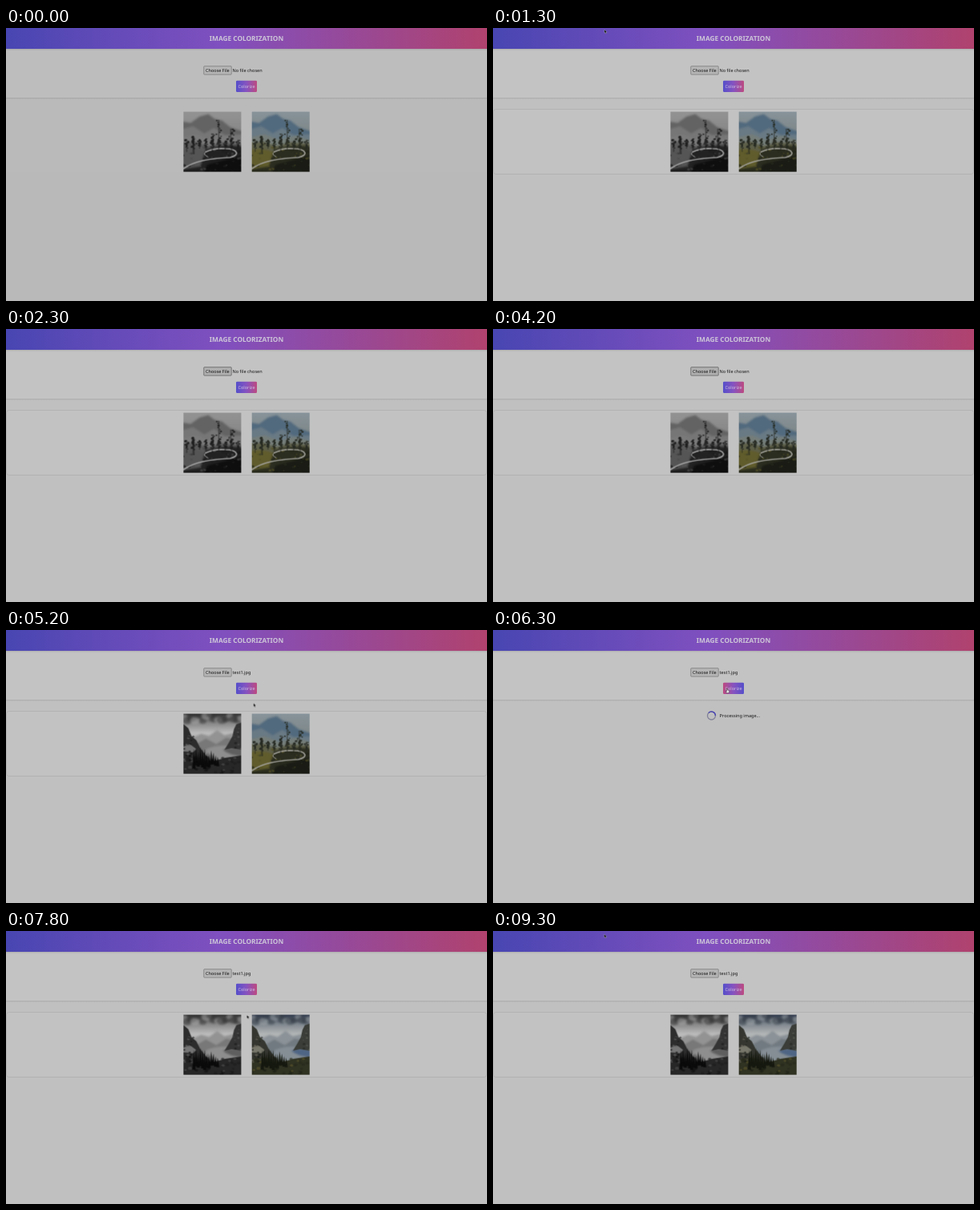
These frames come from a looping animation (600 by 341 pixels, 9400 ms). An HTML page:

```html
<!DOCTYPE html>
<html lang="en">
<head>
<meta charset="utf-8">
<title>Image Colorization</title>
<style>
  html, body { margin: 0; width: 100%; height: 100%; overflow: hidden; background: #c0c0c0; }
  #stage { display: block; width: 100vw; height: 100vh; }
  text { font: 5.55px "Noto Sans", "Open Sans", sans-serif; fill: #161616; text-rendering: geometricPrecision; }
  .title { font-size: 8.3px; font-weight: 600; fill: #cdc6d8; text-anchor: middle; }
  .label { fill: #cbbfdd; text-anchor: middle; }
  .gray { filter: grayscale(1) contrast(1.12); }
  .soft { filter: blur(1.2px); }

  .anim { animation: 9400ms step-end infinite; }
  .dim-top { animation-name: dimTop; }
  .dim-low { animation-name: dimLow; }
  .frame { animation-name: frame; }
  .results { animation-name: results; }
  .busy { animation-name: busy; }
  .spin { animation-name: spin; transform-origin: 272.5px 107px; }
  .old-input { animation-name: oldInput; }
  .new-input { animation-name: newInput; }
  .old-output { animation-name: oldOutput; }
  .new-output { animation-name: newOutput; }
  .no-file { animation-name: noFile; }
  .file { animation-name: file; }
  .choose { animation-name: choose; }
  .pointer { animation-name: pointer; }
  .arrow { animation-name: arrow; }
  .hand { animation-name: hand; }
  .path { animation-name: path; }
  .fill { animation-name: fill; }

  @keyframes dimTop { 0% { opacity: 1 } 10.63%, 100% { opacity: 0 } }
  @keyframes dimLow { 0% { opacity: 1 } 13.82%, 100% { opacity: 0 } }
  @keyframes frame { 0% { opacity: 0 } 10.63%, 100% { opacity: 1 } }
  @keyframes results { 0% { opacity: 1 } 67.01% { opacity: 0 } 76.59%, 100% { opacity: 1 } }
  @keyframes busy { 0% { opacity: 0 } 67.01% { opacity: 1 } 76.59%, 100% { opacity: 0 } }
  @keyframes spin {
    0% { transform: rotate(0) }
    67.01% { transform: rotate(0); animation-timing-function: steps(9) }
    76.59%, 100% { transform: rotate(324deg) }
  }
  @keyframes oldInput { 0% { opacity: 1 } 48.93%, 100% { opacity: 0 } }
  @keyframes newInput { 0% { opacity: 0 } 48.93%, 100% { opacity: 1 } }
  @keyframes oldOutput { 0% { opacity: 1 } 70%, 100% { opacity: 0 } }
  @keyframes newOutput { 0% { opacity: 0 } 70%, 100% { opacity: 1 } }
  @keyframes noFile { 0% { opacity: 1 } 45.74%, 100% { opacity: 0 } }
  @keyframes file { 0% { opacity: 0 } 45.74%, 100% { opacity: 1 } }
  @keyframes choose {
    0% { fill: #b5b5b5; stroke: #747474 }
    21.27% { fill: #afafaf; stroke: #565656 }
    45.74%, 100% { fill: #b5b5b5; stroke: #747474 }
  }
  @keyframes pointer { 0% { opacity: 0 } 13.82% { opacity: 1 } 23.4% { opacity: 0 } 51.06%, 100% { opacity: 1 } }
  @keyframes arrow { 0% { opacity: 1 } 58.5% { opacity: 0 } 82.97%, 100% { opacity: 1 } }
  @keyframes hand { 0% { opacity: 0 } 58.5% { opacity: 1 } 82.97%, 100% { opacity: 0 } }
  @keyframes path {
    0% { transform: translate(139px, 2px) }
    13.82% { transform: translate(139px, 2px); animation-timing-function: steps(5) }
    19.14% { transform: translate(284px, 44px); animation-timing-function: steps(3) }
    22.33% { transform: translate(267px, 53px) }
    51.06% { transform: translate(350px, 158px); animation-timing-function: steps(4) }
    55.31% { transform: translate(308.7px, 91.5px); animation-timing-function: steps(3) }
    58.5% { transform: translate(292px, 73px) }
    82.97% { transform: translate(300.5px, 105px); animation-timing-function: steps(4) }
    87.22% { transform: translate(346px, 150px) }
    88.29% { transform: translate(346px, 150px); animation-timing-function: steps(10) }
    98.92%, 100% { transform: translate(138.7px, 4px) }
  }
  @keyframes fill {
    0% { transform: translateX(0) }
    58.5% { transform: translateX(-26px) }
    82.97%, 100% { transform: translateX(0) }
  }
</style>
</head>
<body>
<svg id="stage" viewBox="0 0 600 341" preserveAspectRatio="none">
  <defs>
    <linearGradient id="bar">
      <stop offset="0" stop-color="#4846b2"/><stop offset=".45" stop-color="#8050bf"/><stop offset="1" stop-color="#b0426e"/>
    </linearGradient>
    <linearGradient id="btn">
      <stop offset="0" stop-color="#564fca"/><stop offset=".25" stop-color="#8653c0"/><stop offset=".5" stop-color="#bd4a80"/>
      <stop offset=".75" stop-color="#8653c0"/><stop offset="1" stop-color="#564fca"/>
    </linearGradient>
    <linearGradient id="shade" x2="0" y2="1">
      <stop offset="0" stop-color="#000" stop-opacity=".1"/><stop offset="1" stop-color="#000" stop-opacity="0"/>
    </linearGradient>
    <linearGradient id="skyA" x2="0" y2="1">
      <stop offset="0" stop-color="#87939a"/><stop offset=".45" stop-color="#7d8585"/><stop offset=".6" stop-color="#55573f"/><stop offset="1" stop-color="#26281a"/>
    </linearGradient>
    <linearGradient id="skyB" x2="0" y2="1">
      <stop offset="0" stop-color="#303a4c"/><stop offset=".15" stop-color="#7d858d"/><stop offset=".32" stop-color="#b3b6b6"/><stop offset=".7" stop-color="#858d93"/>
    </linearGradient>
    <clipPath id="btnClip"><rect x="287" y="65.5" width="26" height="14.5" rx="1.5"/></clipPath>
    <symbol id="road" viewBox="0 0 72 75"></symbol>
    <symbol id="valley" viewBox="0 0 72 75"></symbol>
  </defs>

  <rect width="600" height="341" fill="#c0c0c0"/>
  <path d="M0 26H600V84Q600 87 597 87H3Q0 87 0 84Z" fill="#c3c3c3"/>
  <rect y="87" width="600" height="2.5" fill="url(#shade)"/>
  <rect class="anim dim-top" y="26" width="600" height="154" fill="#000" opacity="0" fill-opacity=".03"/>
  <rect class="anim dim-low" y="180" width="600" height="161" fill="#000" opacity="0" fill-opacity=".04"/>
  <rect y="26" width="600" height="2.5" fill="url(#shade)"/>
  <rect width="600" height="26" fill="url(#bar)"/>
  <text class="title" x="300" y="16">IMAGE COLORIZATION</text>

  <rect class="anim choose" x="246.8" y="47.7" width="34.4" height="10.4" rx=".6" stroke-width=".7"/>
  <text x="249" y="55">Choose File</text>
  <text class="anim no-file" x="282.6" y="55">No file chosen</text>
  <text class="anim file" x="282.6" y="55">test1.jpg</text>

  <g clip-path="url(#btnClip)">
    <rect class="anim fill" x="287" y="65.5" width="52" height="14.5" fill="url(#btn)"/>
  </g>
  <text class="label" x="300" y="74.8">Colorize</text>

  <g class="anim results">
    <rect class="anim frame" x=".5" y="101.5" width="599" height="81" rx="3" fill="#c2c2c2" stroke="#adadad" stroke-width=".7"/>
    <g class="gray">
      <use class="anim old-input" href="#road" x="221.4" y="104.6" width="72" height="75"/>
      <use class="anim new-input" href="#valley" x="221.4" y="104.6" width="72" height="75"/>
    </g>
    <use class="anim old-output" href="#road" x="306.7" y="104.6" width="72" height="75"/>
    <use class="anim new-output" href="#valley" x="306.7" y="104.6" width="72" height="75"/>
  </g>

  <g class="anim busy">
    <g class="anim spin" fill="none" stroke-width="1.3">
      <circle cx="272.5" cy="107" r="5" stroke="#82829a"/>
      <path d="M268.96 103.46A5 5 0 0 1 277.5 107" stroke="#4843b4"/>
    </g>
    <text x="282.6" y="109.2">Processing image...</text>
  </g>

  <g class="anim pointer">
    <g class="anim path">
      <path class="anim arrow" d="M0 0V4.3L1 3.4L1.7 5L2.5 4.6L1.8 3.1H3.1Z" fill="#0c0c0c" stroke="#c8c8c8" stroke-width=".35"/>
      <path class="anim hand" d="M-.5 0Q0-.5 .5 0V2L2.7 2.5V4.2L2 5.8H-.5L-1.7 3.4L-.5 3.6Z" fill="#e2e2e2" stroke="#222" stroke-width=".4"/>
    </g>
  </g>
</svg>
<script>
  let seed = 11;
  const rnd = () => (seed = (seed * 16807) % 2147483647) / 2147483647;
  const between = (a, b) => a + (b - a) * rnd();
  const pick = (...list) => list[Math.floor(rnd() * list.length)];
  const num = v => v.toFixed(1);
  const shape = (fill, d) => `<path fill="${fill}" d="${d}"/>`;
  const soft = content => `<g class="soft">${content}</g>`;
  const blob = (x, y, r, fill, alpha = 1) =>
    `<ellipse cx="${num(x)}" cy="${num(y)}" rx="${num(r)}" ry="${num(r * .75)}" fill="${fill}" opacity="${alpha}"/>`;
  const repeat = (n, make) => Array.from({ length: n }, (_, i) => make(i)).join('');

  // A bare trunk with scattered clumps of leaves
  function tree(x, top, base, w) {
    const leaves = repeat(10, i => blob(x + between(-w, w), top + (base - top) * .7 * i / 10 + 1, between(.8, 1.7), '#262a22', .9));
    return `<path d="M${num(x)} ${num(top)}V${num(base)}" stroke="#2a2b22" stroke-width=".8"/>` + leaves;
  }

  // A pointed conifer
  const fir = (x, top, base) =>
    shape('#15180f', `M${num(x)} ${num(top)}L${num(x + 2)} ${num(base)}H${num(x - 2)}Z`);

  document.getElementById('road').innerHTML =
    '<rect width="72" height="75" fill="url(#skyA)"/>' +
    soft(
      shape('#526a7e', 'M-3 12L9 14L20 6L31 3L39 9L48 11L58 19L75 25V45H-3Z') +
      shape('#697a85', 'M-3 22L12 18L26 27L38 20L52 29L75 28V48H-3Z') +
      shape('#757d79', 'M-3 32L16 28L34 35L54 30L75 36V50H-3Z') +
      shape('#5e5f48', 'M-3 40L14 37L30 43L48 38L75 40V60H-3Z') +
      shape('#605c2c', 'M-3 48Q14 44 30 52L22 68L-3 72Z') +
      shape('#2b2d20', 'M28 47Q50 40 75 44V78H18Z') +
      shape('#191b14', 'M30 66L75 54V78H24Z')) +
    repeat(60, () => blob(between(0, 72), between(38, 75), between(.8, 2.4), pick('#1f2219', '#262a1d', '#565326', '#3f4029'), .65)) +
    '<g fill="none" stroke="#a09f98" stroke-linecap="round"><path d="M0 71Q10 64 24 61T58 57Q67 55 66 51Q64 46 52 46Q38 45 28 50" stroke-width="1.6"/>' +
    '<path d="M28 50Q23 53 30 56" stroke-width="1"/></g>' +
    repeat(9, i => tree(4 + i * 8, between(30, 36), between(46, 51), 2)) +
    tree(44, 10, 45, 3.5) + tree(59, 21, 46, 4.5) + tree(13, 31, 53, 3.5) + tree(37, 27, 46, 2.5);

  document.getElementById('valley').innerHTML =
    '<rect width="72" height="75" fill="url(#skyB)"/>' +
    soft(
      repeat(16, i => blob(i * 4.8, between(0, 10), between(4, 7), i % 3 ? '#343b46' : '#9ca1a5', .5)) +
      shape('#8b9298', 'M8 32L22 25L32 28L42 20L51 27L62 24V75H8Z') +
      shape('#717a80', 'M14 39L28 31L41 38L53 30L72 33V75H14Z') +
      shape('#858e95', 'M28 44Q46 36 75 43V63H28Z') +
      shape('#4f6584', 'M49 45Q60 40 75 45V53Q57 52 49 45Z')) +
    shape('#3a3d38', 'M72 11L66 13L63 19L61 28L56 37L51 45L60 43L72 45Z') +
    shape('#34362f', 'M0 13L6 18L10 28L16 33L21 43L32 57V75H0Z') +
    shape('#77766a', 'M0 41L8 38L16 44L12 48L0 47Z') +
    shape('#303222', 'M0 56L16 53L35 60L52 55L72 52V75H0Z') +
    repeat(40, () => blob(between(0, 72), between(54, 75), between(.8, 2.6), pick('#1c2015', '#262a1b', '#5b552d'), .65)) +
    repeat(24, () => blob(between(0, 14), between(27, 62), between(.7, 1.8), pick('#1a1d18', '#66645a'), .7)) +
    repeat(12, () => blob(between(62, 72), between(16, 44), between(.7, 1.8), pick('#22251f', '#595b52'), .6)) +
    repeat(12, i => fir(13 + i * 2.7, 42 + i * .8 + between(-4, 4), between(62, 70)));
</script>
</body>
</html>
```
